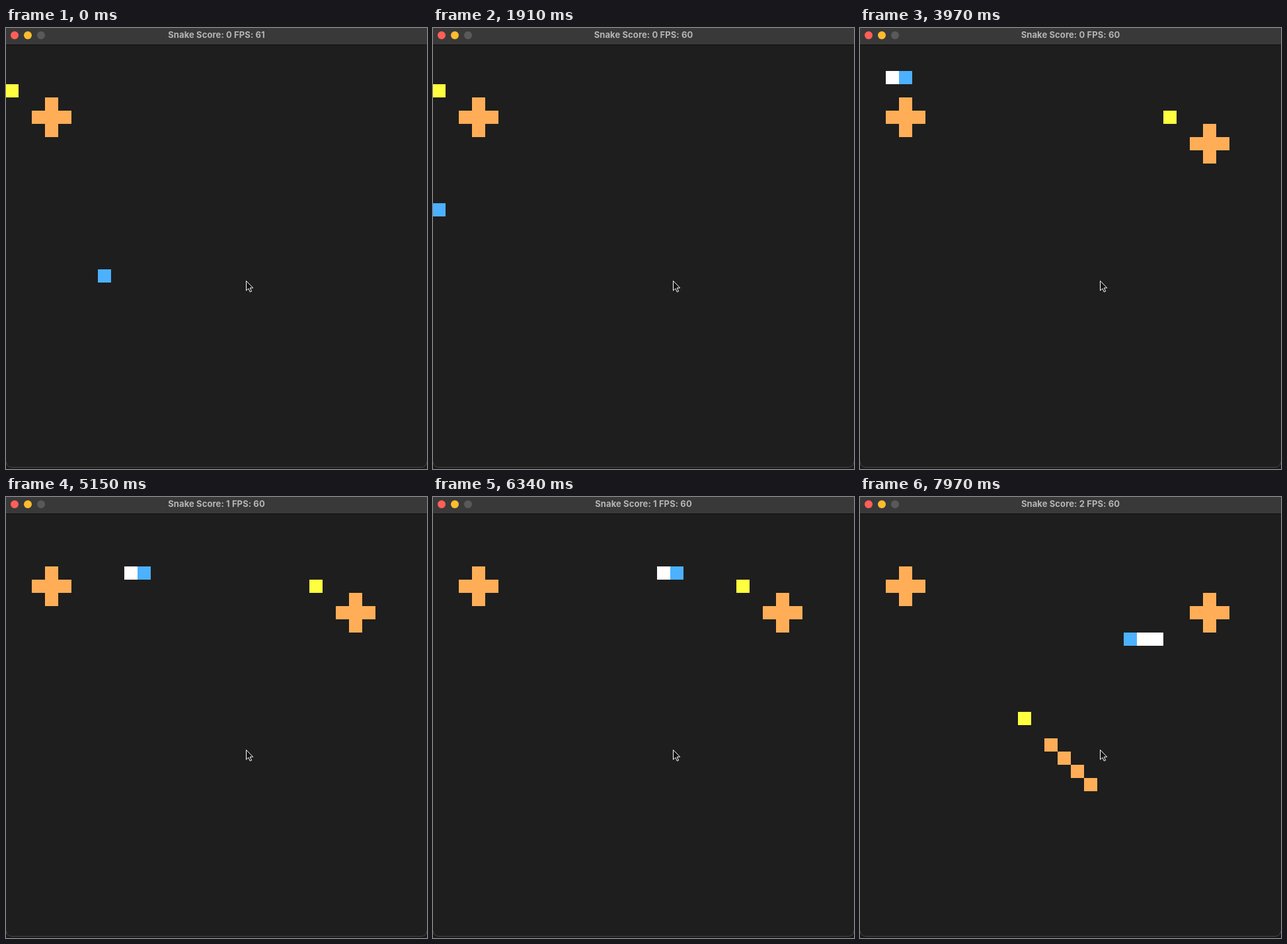
Write an HTML page that moves like this. It is 637 px wide and 667 px high and loops after 8 s.

```html
<!DOCTYPE html>
<html lang="en">
<head>
<meta charset="utf-8">
<title>Snake</title>
<style>
  html, body { margin: 0; width: 100%; height: 100%; overflow: hidden; background: #1e1e1e; }
  svg { display: block; }
  #title { font: 700 13px Inter, "Open Sans", sans-serif; letter-spacing: .1px; fill: #b5b5b6; text-anchor: middle; }
  .cells { shape-rendering: crispEdges; }
</style>
</head>
<body>
<svg width="637" height="667" viewBox="0 0 637 667">
  <rect width="637" height="667" fill="#1e1e1e"/>
  <rect width="637" height="25" fill="#39393a"/>
  <rect y="25" width="637" height="1" fill="#0c0c0c"/>
  <circle cx="13" cy="11" r="6" fill="#ff5f57"/>
  <circle cx="33" cy="11" r="6" fill="#febc2e"/>
  <circle cx="53" cy="11" r="6" fill="#59595b"/>
  <text id="title" x="318.5" y="15"></text>
  <path d="M0 656Q1 664.5 9 664.5H628Q636 664.5 637 656V667H0Z" fill="#191919"/>
  <path d="M0 656Q1 664.5 9 664.5H628Q636 664.5 637 656" fill="none" stroke="#484848"/>
  <g class="cells">
    <path id="walls" fill="#ffae57"/>
    <path id="food" fill="#ffff40"/>
    <path id="body" fill="#fff"/>
    <path id="head" fill="#4cb1ff"/>
  </g>
  <path d="M363.5 382.5v14.6l3.3-3.1 2.5 5.2 2.3-1-2.4-5.1h4.5z" fill="#111" stroke="#fff"/>
</svg>
<script>
  const LOOP = 8000;
  const byId = id => document.getElementById(id);

  // Grid cells visited by the head, from a run-length route.
  const DIRS = { L: [-1, 0], R: [1, 0], U: [0, -1], D: [0, 1] };
  const trail = [[7, 18]];
  for (const [, dir, count] of "L6U3L1U12R8D2R15D5L3".matchAll(/([LRUD])(\d+)/g)) {
    for (let i = 0; i < count; i++) {
      const [x, y] = trail[trail.length - 1];
      trail.push([x + DIRS[dir][0], y + DIRS[dir][1]]);
    }
  }

  // Each run of ticks: first time, last time, number of ticks.
  const ticks = [
    [290, 1330, 8], [1470, 1910, 4], [2210, 3230, 8], [3370, 4410, 8],
    [4560, 4560, 1], [4860, 5890, 8], [6040, 7080, 8], [7220, 7970, 6]
  ].flatMap(([from, to, n]) => Array.from({ length: n }, (_, i) =>
    Math.round((from + (to - from) * i / Math.max(1, n - 1)) / 10) * 10));
  const doubleTicks = [29, 30, 48, 51];
  const meals = [21, 48];

  const cross = (x, y) => [[x, y - 1], [x - 1, y], [x, y], [x + 1, y], [x, y + 1]];
  const diagonal = (x, y) => [0, 1, 2, 3].map(i => [x + i, y + i]);
  const walls = [cross(3, 6), cross(26, 8), diagonal(14, 18)];
  const foods = [[0, 4], [23, 6], [12, 16]];

  // The title refreshes once a second, so it lags behind the score.
  const titles = [[7370, 2, 60], [4410, 1, 60], [440, 0, 60], [0, 0, 61]];

  const cells = list => list.map(([x, y]) => `M${20 * x - 1} ${20 * y + 5}h20v20h-20z`).join("");
  const setCells = (id, list) => byId(id).setAttribute("d", cells(list));

  function draw(t) {
    const ticked = ticks.filter(at => at <= t).length;
    const moves = ticked + doubleTicks.filter(n => n <= ticked).length;
    const eaten = meals.filter(n => n <= moves).length;
    setCells("head", [trail[moves]]);
    setCells("body", trail.slice(moves - eaten, moves));
    setCells("food", [foods[eaten]]);
    setCells("walls", walls.slice(0, eaten + 1).flat());
    const [, score, fps] = titles.find(([at]) => at <= t);
    byId("title").textContent = `Snake Score: ${score} FPS: ${fps}`;
  }

  const start = performance.now();
  function frame() {
    draw((performance.now() - start) % LOOP);
    requestAnimationFrame(frame);
  }
  frame();
</script>
</body>
</html>
```
